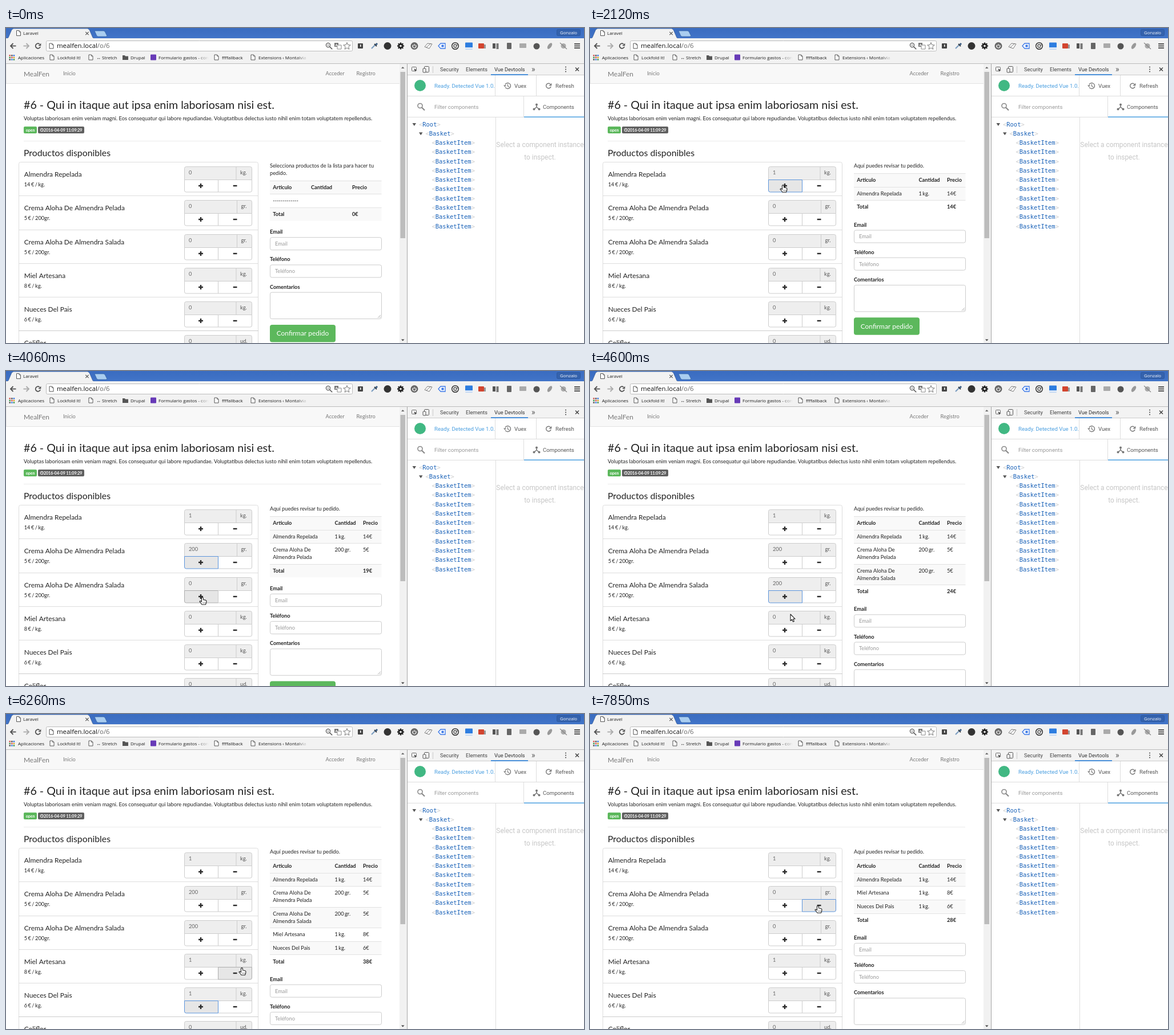
These frames come from a looping animation (1012 px wide and 553 px high, 8 s). An HTML page with a canvas:

```html
<!DOCTYPE html>
<html lang="es">
<head>
<meta charset="utf-8">
<title>Laravel</title>
<style>
html, body { margin: 0; width: 100%; height: 100%; overflow: hidden; background: #fff; }
canvas { display: block; width: 1012px; height: 553px; }
</style>
</head>
<body>
<canvas id="stage"></canvas>
<script>
const W = 1012, H = 553, LOOP = 8000;
const canvas = document.getElementById('stage');
const ratio = window.devicePixelRatio || 1;
canvas.width = W * ratio;
canvas.height = H * ratio;
const c = canvas.getContext('2d');

const LATO = 'Lato, sans-serif', UI = '"Open Sans", "Noto Sans", sans-serif';
const ROBOTO = 'Roboto, sans-serif', MONO = '"DejaVu Sans Mono", monospace';
const INK = '#222', LINE = '#ddd', PITCH = 59.25;

const products = [
  { name: 'Almendra Repelada', lines: ['Almendra Repelada'], price: 14, unit: 'kg.', step: 1 },
  { name: 'Crema Aloha De Almendra Pelada', lines: ['Crema Aloha De', 'Almendra Pelada'], price: 5, unit: 'gr.', step: 200 },
  { name: 'Crema Aloha De Almendra Salada', lines: ['Crema Aloha De', 'Almendra Salada'], price: 5, unit: 'gr.', step: 200 },
  { name: 'Miel Artesana', lines: ['Miel Artesana'], price: 8, unit: 'kg.', step: 1 },
  { name: 'Nueces Del Pais', lines: ['Nueces Del Pais'], price: 6, unit: 'kg.', step: 1 },
  { name: 'Coliflor', lines: ['Coliflor'], price: 2, unit: 'ud.', step: 1 }
];

// press time, release time, product, direction
const clicks = [
  [1800, 1900, 0, 1], [3120, 3580, 1, 1], [4140, 4240, 2, 1], [5060, 5150, 3, 1],
  [5890, 5970, 4, 1], [6840, 6930, 2, -1], [7640, 7720, 1, -1]
];

// time, x, y of the pointer tip
const track = [
  [910, 425, 119], [1200, 330, 235], [1420, 275, 287], [1670, 338, 276], [2350, 338, 276],
  [2640, 345, 311], [2810, 345, 311], [3140, 343, 345], [3320, 343, 345], [3500, 343, 339],
  [3640, 343, 339], [4080, 344, 398], [4280, 344, 398], [4600, 351, 427], [4920, 343, 456],
  [5180, 343, 456], [5390, 355, 487], [5800, 344, 515], [6000, 344, 515], [6260, 413, 446],
  [6620, 402, 408], [6750, 402, 408], [6830, 401, 399], [6960, 401, 399], [7490, 399, 348],
  [7560, 399, 348], [7640, 399, 337]
];

function text(s, x, y, size, color = INK, font = LATO, weight = 400, align = 'left') {
  c.font = `${weight} ${size}px ${font}`;
  c.fillStyle = color;
  c.textAlign = align;
  c.fillText(s, x, y);
}

// amounts are set with narrow word spaces
function amount(s, x, y, weight = 400) {
  c.wordSpacing = '-0.9px';
  text(s, x, y, 9.25, INK, LATO, weight);
  c.wordSpacing = '0px';
}

function rect(x, y, w, h, color) {
  c.fillStyle = color;
  c.fillRect(x, y, w, h);
}

function box(x, y, w, h, fill, stroke, r = 0) {
  c.beginPath();
  c.roundRect(x, y, w, h, r);
  if (fill) { c.fillStyle = fill; c.fill(); }
  if (stroke) { c.strokeStyle = stroke; c.lineWidth = 1; c.stroke(); }
}

function poly(points, fill, stroke, width = 1, close = true) {
  c.beginPath();
  for (let i = 0; i < points.length; i += 2) c.lineTo(points[i], points[i + 1]);
  if (close) c.closePath();
  if (fill) { c.fillStyle = fill; c.fill(); }
  if (stroke) { c.strokeStyle = stroke; c.lineWidth = width; c.stroke(); }
}

function line(x1, y1, x2, y2, color, width = 1) {
  poly([x1, y1, x2, y2], null, color, width, false);
}

function arc(x, y, r, color, width = 0, from = 0, to = Math.PI * 2) {
  c.beginPath();
  c.arc(x, y, r, from, to);
  if (width) { c.strokeStyle = color; c.lineWidth = width; c.stroke(); }
  else { c.fillStyle = color; c.fill(); }
}

function shade(x1, y1, x2, y2, from, to) {
  const g = c.createLinearGradient(x1, y1, x2, y2);
  g.addColorStop(0, from);
  g.addColorStop(1, to);
  return g;
}

function pageIcon(x, y) {
  poly([x, y, x + 4.5, y, x + 7, y + 2.5, x + 7, y + 9, x, y + 9], '#fff', '#555', 1);
  poly([x + 4.5, y, x + 4.5, y + 2.5, x + 7, y + 2.5], null, '#555', 0.8, false);
}

function reloadIcon(x, y, r, color, width) {
  arc(x, y, r, color, width, 0.3, 5.4);
  poly([x + r + 1, y - r - 0.5, x + r + 1, y - 0.3, x + 0.3, y - 0.3], color);
}

function lens(x, y, r, color, width) {
  arc(x, y, r, color, width);
  line(x + r * 0.75, y + r * 0.75, x + r * 2, y + r * 2, color, width * 1.3);
}

function gear(x, y) {
  for (let i = 0; i < 4; i++) {
    const a = i * Math.PI / 4, dx = Math.cos(a) * 6, dy = Math.sin(a) * 6;
    line(x - dx, y - dy, x + dx, y + dy, '#222', 2.4);
  }
  arc(x, y, 4.4, '#222');
  arc(x, y, 1.8, '#f2f2f2');
}

function arrowIcon(x, y, dir, color) {
  line(x - 4.5 * dir, y, x + 5 * dir, y, color, 1.8);
  poly([x + 0.5 * dir, y - 4.5, x + 5 * dir, y, x + 0.5 * dir, y + 4.5], null, color, 1.8, false);
}

function cross(x, y, r, color, width) {
  line(x - r, y - r, x + r, y + r, color, width);
  line(x - r, y + r, x + r, y - r, color, width);
}

function extensions() {
  box(616, 27, 9, 9, '#444', null, 1);
  rect(620, 29, 1.5, 4, '#fff');
  line(640, 36, 646, 30, '#7a9cc0', 2.2);
  line(645, 28, 649, 32, '#333', 2);
  line(647, 30, 650, 27, '#3a5a80', 3);
  arc(668, 31.5, 6.5, '#333');
  gear(691, 31.5);
  arc(715, 31.5, 6.5, '#666');
  arc(715, 32, 3, '#fff', 1.2, -0.9, 4);
  line(715, 28, 715, 31.5, '#fff', 1.2);
  poly([733, 33, 738, 27, 746, 28, 741, 36], '#fff', '#777', 1);
  line(736, 34, 744, 27, '#777');
  poly([757, 31.5, 761, 27, 769, 27, 769, 36, 761, 36], '#fff', '#3b78e7', 1.3);
  box(762.5, 29.5, 4, 4, '#3b78e7');
  arc(786.5, 31.5, 5.8, '#333', 1.5);
  reloadIcon(786.5, 31.5, 2.6, '#333', 1.2);
  box(804, 25.5, 13, 12, '#2d7de0', null, 1);
  rect(804, 34, 13, 3.5, '#dce8f8');
  box(827, 27, 10, 9, '#d2452f', null, 1);
  rect(837, 29, 3, 7, '#999');
  rect(852, 27, 5, 9, '#555');
  rect(858.5, 27, 4, 10, '#777');
  box(877, 26, 8, 11, '#666', null, 1);
  box(899, 27, 12, 8, '#aaa', null, 1);
  arc(929, 32, 5.5, '#555');
  c.beginPath();
  c.ellipse(952, 31.5, 3, 6, 0.6, 0, 7);
  c.fillStyle = '#999';
  c.fill();
  arc(976, 31.5, 4.5, '#aaa');
  line(970, 26, 982, 37, '#888', 1.2);
  for (let i = 0; i < 3; i++) rect(995, 27 + i * 3.6, 10, 1.8, '#444');
}

function browser() {
  rect(0, 0, W, 18, shade(0, 0, 0, 18, '#3a6cc0', '#4174c8'));
  rect(0, 18, W, 45, '#f2f2f2');
  poly([0, 18.5, 4, 17, 10, 3, 13, 1, 143, 1, 146, 3, 152, 17, 156, 18.5], '#f2f2f2', '#2f5796', 0.7);
  rect(0, 18, W, 2, '#f2f2f2');
  poly([155, 5, 171, 5, 173, 6, 177, 14, 175, 15, 161, 15, 159, 14], '#a9cdf0', '#315f9f', 0.7);
  pageIcon(18.5, 4.5);
  text('Laravel', 30, 12.3, 8, '#222', UI);
  cross(142, 9.5, 2.7, '#555', 1.2);
  box(964.5, 2.5, 41, 11, '#3462ad', '#2e599f', 2);
  text('Gonzalo', 985, 10.8, 7.8, '#fff', UI, 400, 'center');

  arrowIcon(13, 31.5, -1, '#505050');
  arrowIcon(35, 31.5, 1, '#aaa');
  reloadIcon(56, 31.5, 4.3, '#505050', 1.7);
  box(70.5, 22.5, 536, 18, '#fff', '#bcbcbc', 2);
  pageIcon(76, 27);
  const host = 'mealfen.local';
  text(host, 89, 35.2, 11.4, '#111', UI);
  text('/o/6', 89 + c.measureText(host).width, 35.2, 11.4, '#666', UI);
  lens(564, 30, 3.6, '#555', 1.2);
  line(562.3, 30, 565.7, 30, '#555');
  box(575, 26, 7, 7, '#777');
  box(580, 30, 7, 7, '#fff', '#888');
  text('A', 578.5, 32, 6, '#fff', UI, 700, 'center');
  const star = [];
  for (let i = 0; i < 10; i++) {
    const r = i % 2 ? 2.9 : 6.6, a = i * Math.PI / 5 - Math.PI / 2;
    star.push(597 + Math.cos(a) * r, 32 + Math.sin(a) * r);
  }
  poly(star, '#fff', '#777');
  extensions();
  bookmarks();
  rect(0, 62, W, 1, '#bbb');
}

function bookmarks() {
  const dots = ['#d9534f', '#555', '#3b78e7', '#3c9a50', '#d9534f', '#d9a520', '#555', '#3b78e7', '#3c9a50'];
  dots.forEach((d, i) => rect(5.5 + i % 3 * 3.6, 47 + Math.floor(i / 3) * 3.6, 2.5, 2.5, d));
  const items = [[21, 'Aplicaciones'], [90, 'Lockfold It!'], [158, '↔ Stretch'], [218, 'Drupal'],
    [267, 'Formulario gastos - con'], [378, 'ffffallback'], [442, 'Extensions ‹ Montalvia A']];
  items.forEach(([x, s]) => text(s, x, 54.8, 8, '#1c1c1c', UI));
  [77, 145, 365, 429].forEach(x => pageIcon(x, 47));
  poly([204, 48, 208, 48, 209, 49.5, 214, 49.5, 214, 56, 204, 56], '#555');
  box(253, 46.5, 10, 10, '#673ab7', null, 1);
  [335, 508].forEach(x => rect(x, 45, 20, 14, shade(x, 0, x + 20, 0, 'rgba(242,242,242,0)', '#f2f2f2')));
  rect(355, 45, 8, 14, '#f2f2f2');
  rect(528, 45, 30, 14, '#f2f2f2');
}

function devtools() {
  rect(702, 63, W - 702, H - 63, '#fff');
  rect(703, 63, W - 703, 19, '#f3f3f3');
  rect(703, 82, W - 703, 1, '#ccc');
  box(710.5, 68.5, 8, 7, null, '#666', 1);
  poly([714, 71, 720, 74, 717.5, 75, 716.5, 77.5], '#333', '#f3f3f3', 0.5);
  box(732.5, 67.5, 8, 10, null, '#555', 1);
  box(730, 71, 5, 7, '#f3f3f3', '#555', 1);
  rect(747, 67, 1, 12, '#ccc');
  text('Security', 760, 76.2, 9.2, '#444', ROBOTO);
  text('Elements', 805, 76.2, 9.2, '#444', ROBOTO);
  text('Vue Devtools', 855, 76.2, 9.2, '#333', ROBOTO);
  rect(849, 81, 65, 2, '#4a90d9');
  text('»', 920, 77, 14, '#555', ROBOTO);
  [68.5, 72.5, 76.5].forEach(y => arc(980, y, 1, '#444'));
  cross(1000, 72.5, 3, '#444', 1.5);

  arc(725, 101, 10, '#41b883');
  c.save();
  c.beginPath();
  c.rect(703, 84, 153, 35);
  c.clip();
  text('Ready. Detected Vue 1.0.', 750, 105, 9.6, '#4a9fe0', ROBOTO);
  c.restore();
  rect(856, 83, 1, 36, LINE);
  rect(928, 83, 1, 36, LINE);
  rect(703, 119, W - 703, 1, LINE);
  arc(878.5, 101.5, 5, '#777', 1.3, -2.7, 2.6);
  poly([871, 100.5, 876, 100.5, 873.5, 103.5], '#777');
  poly([878.5, 98.5, 878.5, 102, 881, 103.5], null, '#777', 1.2, false);
  text('Vuex', 890, 105, 9.6, '#555', ROBOTO);
  reloadIcon(950, 101.5, 4.3, '#777', 1.4);
  text('Refresh', 962, 105, 9.6, '#555', ROBOTO);

  lens(725, 136.5, 4, '#888', 1.6);
  text('Filter components', 750, 141.7, 9.6, '#999', ROBOTO);
  rect(906, 120, 1, 36, LINE);
  line(929, 134, 929, 139, '#777', 1.4);
  poly([924.5, 143, 929, 138.5, 933.5, 143], null, '#777', 1.4, false);
  [[929, 134.5], [924.5, 142.5], [933.5, 142.5]].forEach(([x, y]) => arc(x, y, 2, '#777'));
  text('Components', 940, 142.3, 9.6, '#555', ROBOTO);
  rect(703, 156, 204, 1, LINE);
  rect(907, 155.5, W - 907, 1.5, '#4a9fe0');
  rect(857, 157, 1, H - 157, LINE);

  node('Root', 723, 0, true);
  node('Basket', 734.5, 1, true);
  for (let i = 2; i < 12; i++) node('BasketItem', 745.5, i, false);
  text('Select a component instance', 935, 208.8, 11.9, '#c6c6c6', ROBOTO, 400, 'center');
  text('to inspect.', 935, 230.8, 11.9, '#c6c6c6', ROBOTO, 400, 'center');
  rect(702, 63, 1, H - 63, '#a5a5a5');
}

function node(name, x, row, open) {
  const y = 172.5 + row * 16.28, ch = 6.3;
  if (open) poly([x - 11.5, y - 5.5, x - 5, y - 5.5, x - 8.2, y - 0.5], '#555');
  text('<', x, y, 10.45, '#ccc', MONO);
  text(name, x + ch, y, 10.45, '#1a62b8', MONO);
  text('>', x + ch * (name.length + 1), y, 10.45, '#ccc', MONO);
}

function pageHead() {
  rect(0, 63, 689, H - 63, '#fff');
  rect(0, 63, 689, 34, '#f8f8f8');
  rect(0, 97, 689, 1, '#e3e3e3');
  rect(0, 63, 1, 34, '#e7e7e7');
  text('MealFen', 31, 85, 11.9, '#777');
  text('Inicio', 100, 83.4, 9.25, '#777');
  text('Acceder', 559.5, 83.4, 9.25, '#777');
  text('Registro', 613.5, 83.4, 9.25, '#777');
  text('#6 - Qui in itaque aut ipsa enim laboriosam nisi est.', 31, 142.4, 19.67);
  text('Voluptas laboriosam enim veniam magni. Eos consequatur qui labore repudiandae. Voluptatibus delectus iusto nihil enim totam voluptatem repellendus.', 31, 162.2, 9.24);
  box(31, 173, 23, 12, '#5cb85c', null, 2);
  text('open', 42.5, 181.7, 7, '#fff', LATO, 700, 'center');
  box(56, 173, 81, 12, '#606060', null, 2);
  arc(62.8, 179, 2.7, '#fff', 1);
  poly([62.8, 177.3, 62.8, 179.2, 64, 179.6], null, '#fff', 0.8, false);
  text('2016-04-09 11:09:29', 66, 181.7, 7, '#fff', LATO, 700);
  rect(31, 198, 626, 1, '#eaeaea');
  text('Productos disponibles', 31, 225.4, 15.8);

  rect(689, 63, 13, H - 63, '#f1f1f1');
  rect(690.5, 77, 8.5, 292, '#bcbcbc');
  poly([692, 71, 697.5, 71, 694.7, 68], '#666');
  poly([692, 546.5, 697.5, 546.5, 694.7, 549.5], '#444');
}

const rowTop = i => Math.round(235 + i * PITCH);

function buttonAt(x, y) {
  for (let i = 0; i < 5; i++) {
    const top = rowTop(i) + 31;
    if (y >= top && y <= top + 22 && x >= 312 && x <= 431) return { row: i, dir: x < 371.5 ? 1 : -1 };
  }
  return null;
}

const same = (a, row, dir) => a && a.row === row && a.dir === dir;

function button(row, dir, state) {
  const x = dir > 0 ? 312.5 : 371.5, y = rowTop(row) + 31.5, w = 59;
  const hover = same(state.hover, row, dir), focus = same(state.focus, row, dir);
  const active = focus && state.down;
  const fill = active ? '#d2d2d2' : hover || focus ? '#e6e6e6' : '#fff';
  box(x, y, w, 21.5, fill, focus ? '#5b94dc' : hover ? '#adadad' : '#ccc', dir > 0 ? [0, 0, 0, 3] : [0, 0, 3, 0]);
  if (active) rect(x + 0.5, y + 0.5, w - 1, 2, 'rgba(0,0,0,.1)');
  const mx = dir > 0 ? 341 : 401, my = y + 10.5;
  if (dir > 0) {
    rect(mx - 4, my - 1.2, 8, 2.4, '#2b2b2b');
    rect(mx - 1.2, my - 4, 2.4, 8, '#2b2b2b');
  } else rect(mx - 3.3, my - 1.2, 6.8, 2.4, '#2b2b2b');
}

function productList(state) {
  box(22.5, 235.5, 419, 340, '#fff', LINE, 3);
  products.forEach((p, i) => {
    const top = rowTop(i), per = p.step > 1 ? p.step + p.unit : p.unit;
    if (i) rect(22, top, 420, 1, i === 5 ? '#ccc' : LINE);
    text(p.name, 31.7, top + 25.5, 11.9);
    amount(`${p.price} € / ${per}`, 31.7, top + 43);
    box(312.5, top + 8.5, 118, 23, '#eee', '#ccc', [3, 3, 0, 0]);
    rect(p.unit === 'gr.' ? 404 : 402.5, top + 9, 1, 22, '#ccc');
    text(state.qty[i] * p.step, 320, top + 22.4, 9.25, '#666');
    text(p.unit, p.unit === 'gr.' ? 411.5 : 410, top + 22.2, 9.25, '#555');
    for (const dir of [1, -1]) if (!same(state.focus, i, dir)) button(i, dir, state);
  });
  if (state.focus) button(state.focus.row, state.focus.dir, state);
}

function field(label, hint, y, h) {
  text(label, 462, y + 3.3, 9.25, INK, LATO, 700);
  box(462.5, y + 9.8, 195, h, '#fff', '#ccc', 3);
  if (hint) text(hint, 471, y + 24.2, 9.25, '#999');
}

function basket(qty) {
  const chosen = products.filter((p, i) => qty[i] > 0);
  const empty = !chosen.length;
  const cols = empty ? [467.3, 534, 606] : [467.3, 575.5, 625];
  let y = empty ? 267.5 : 254.8;
  const row = (cells, gray, weight, lines = 1) => {
    const h = 23.7 + (lines - 1) * 12.7;
    if (gray) rect(462, y, 195.5, h, '#f9f9f9');
    rect(462, Math.round(y), 195.5, 1, '#e2e2e2');
    cells.forEach((cell, i) => [].concat(cell).forEach((s, n) => {
      const base = y + 15.2 + n * 13;
      if (i) amount(s, cols[i], base, weight);
      else text(s, cols[i], base, 9.25, INK, LATO, weight);
    }));
    y += h;
  };
  if (empty) {
    text('Selecciona productos de la lista para hacer tu', 462, 244.7, 9.25);
    text('pedido.', 462, 257.7, 9.25);
  } else text('Aquí puedes revisar tu pedido.', 462, 244.7, 9.25);

  row(['Articulo', 'Cantidad', 'Precio'], true, 700);
  if (empty) row(['-------------'], false, 400);
  chosen.forEach((p, i) => row([p.lines, p.step + ' ' + p.unit, p.price + '€'], i % 2 === 0, 400, p.lines.length));
  const total = chosen.reduce((sum, p) => sum + p.price, 0);
  row(['Total', '', total + '€'], empty || chosen.length % 2 === 0, 700);

  y += 19.3;
  field('Email', 'Email', y, 22);
  field('Teléfono', 'Teléfono', y + 48.2, 22);
  field('Comentarios', '', y + 96.4, 46.5);
  line(651, y + 151, 656, y + 146, '#999', 0.8);
  line(654, y + 151, 656, y + 149, '#999', 0.8);
  box(462, y + 163, 115, 30.5, '#5cb85c', null, 4);
  text('Confirmar pedido', 519.5, y + 182.4, 11.95, '#fff', LATO, 400, 'center');
}

function pointerAt(t) {
  if (t < track[0][0]) return null;
  const n = track.findIndex(k => k[0] > t);
  if (n < 0) return track[track.length - 1].slice(1);
  const [t0, x0, y0] = track[n - 1], [t1, x1, y1] = track[n];
  const u = (t - t0) / (t1 - t0), e = u * u * (3 - 2 * u);
  return [x0 + (x1 - x0) * e, y0 + (y1 - y0) * e];
}

function drawPointer([x, y], hand) {
  c.save();
  c.translate(x, y);
  c.lineJoin = 'round';
  if (hand) {
    poly([-1.5, 0.5, 0, -0.5, 1.3, 0.5, 1.6, 4, 4, 4.2, 6.3, 5, 7, 6.2, 6.6, 9.5, 5.5, 12.3, -1, 12.3,
      -2.5, 10, -5, 7.2, -4.4, 6, -3, 6.2, -1.5, 7.5], '#fff', '#222', 1.1);
    [1, 3, 5].forEach(dx => line(dx, 8, dx, 10.5, '#555', 0.7));
  } else {
    poly([0, 0, 0, 11.5, 2.6, 9.2, 4.5, 13.3, 6.4, 12.5, 4.6, 8.4, 8, 8.2], '#fff', '#222', 1.1);
  }
  c.restore();
}

function stateAt(t) {
  const qty = products.map(() => 0);
  let focus = null, down = false;
  for (const [press, release, row, dir] of clicks) {
    if (t >= press) { focus = { row, dir }; down = t < release; }
    if (t >= release) qty[row] += dir;
  }
  const pointer = pointerAt(t);
  return { qty, focus, down, pointer, hover: pointer && buttonAt(...pointer) };
}

function draw(now) {
  const state = stateAt(now % LOOP);
  c.setTransform(ratio, 0, 0, ratio, 0, 0);
  pageHead();
  productList(state);
  basket(state.qty);
  browser();
  devtools();
  if (state.pointer) drawPointer(state.pointer, state.hover);
}

const start = performance.now();
function tick() {
  draw(performance.now() - start);
  requestAnimationFrame(tick);
}
tick();
</script>
</body>
</html>
```
